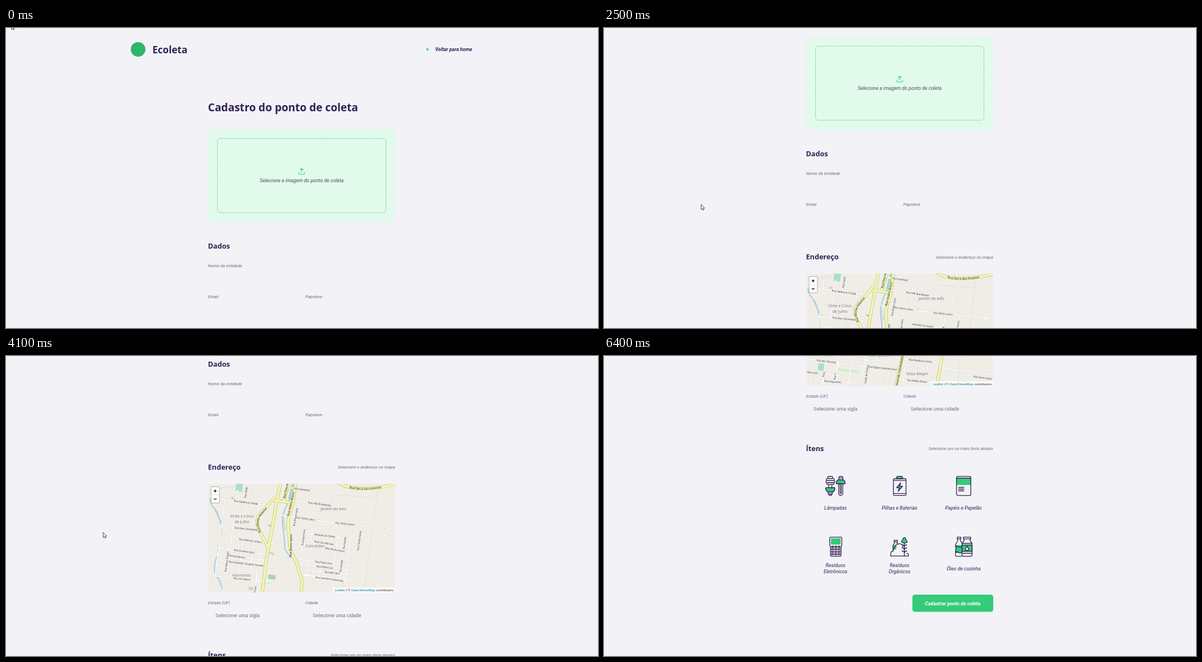
Animation of 1051 by 533 pixels, one loop 7.2 s. Source, as an HTML page:

```html
<!DOCTYPE html>
<html lang="pt-BR">
<head>
<meta charset="utf-8">
<title>Cadastro do ponto de coleta</title>
<style>
  html, body { margin: 0; height: 100%; overflow: hidden; background: #f3f2f7; }
  svg { display: block; width: 1051px; height: 533px; }
  .head { font: 700 12.65px "Open Sans", sans-serif; fill: #322153; }
  .hint, .item { font: italic 7.66px Roboto, sans-serif; fill: #6c6c80; }
  .item { font-size: 8.75px; fill: #322153; text-anchor: middle; }
  .bold { font-weight: 700; }
  .end { text-anchor: end; }
  .field { font: 8.75px "Liberation Sans", Arial, sans-serif; fill: #6c6c80; }
  .line { fill: none; stroke: #34cb79; stroke-width: 1.1; stroke-linecap: round; stroke-linejoin: round; }
  .icon { fill: none; stroke: #322153; stroke-width: 1.3; stroke-linejoin: round; stroke-linecap: round; }
  .icon .g { fill: #34cb79; }
  .map text { font: 4.3px "Noto Sans", sans-serif; fill: #222; text-anchor: middle;
    paint-order: stroke; stroke: #fffa; stroke-width: .6px; }
  .map .area { font-size: 6.9px; fill: #707080; }
  .map .wide { font-size: 5.3px; font-weight: 500; fill: #222; stroke: none; }
  .map .water { fill: #5f96b8; }
  .map path { fill: none; stroke-linejoin: round; }
  .credit { font: 6.02px "Liberation Sans", Arial, sans-serif; fill: #333; }
  .credit tspan { fill: #0078a8; }
</style>
</head>
<body>
<svg viewBox="0 0 1051 533">
  <defs>
    <clipPath id="frame"><rect width="332" height="193" rx="1"/></clipPath>
    <path id="arc" d="M229 -3Q262 18 331 1"/>
    <path id="bend" d="M100 97Q80 74 92 56L112 32"/>
  </defs>
  <g id="page">
    <circle cx="234.5" cy="38" r="13" fill="#2fb66c"/>
    <text class="head" x="260" y="44.5" style="font-size:17.1px">Ecoleta</text>
    <path class="line" d="M751.5 38h-5M749 35.4l-2.6 2.6 2.6 2.6"/>
    <text class="item bold" x="762" y="41.3" style="text-anchor:start">Voltar para home</text>
    <text class="head" x="358.5" y="148.3" style="font-size:19.04px">Cadastro do ponto de coleta</text>

    <rect x="358.7" y="180" width="332.2" height="164.5" rx="5.5" fill="#e1faec"/>
    <rect x="375.5" y="196.3" width="299" height="131.6" rx="5.5" fill="none" stroke="#4ecb79" stroke-width=".9" stroke-dasharray="1.8 1.3"/>
    <path class="line" d="M519.7 256.5v2q0 1.5 1.5 1.5h7.4q1.5 0 1.5-1.5v-2M525 256.5v-7M522 252.3l3-3 3 3"/>
    <text class="item" x="525" y="274.3" style="fill:#4e4958">Selecione a imagem do ponto de coleta</text>

    <text class="head" x="358.5" y="392">Dados</text>
    <text class="hint" x="358.7" y="425">Nome da entidade</text>
    <text class="hint" x="358.7" y="480">Email</text>
    <text class="hint" x="531.3" y="480">Papoleve</text>

    <text class="head" x="358.5" y="575.3">Endereço</text>
    <text class="hint end" x="690.7" y="573.6">Selecione o endereço no mapa</text>
    <g transform="translate(359 600.5)" clip-path="url(#frame)">
      <g class="map" id="first"></g>
      <g class="map" id="second"></g>
      <rect x="4.6" y="4.6" width="15.8" height="30" rx="2.5" fill="#0004"/>
      <rect x="5.6" y="5.6" width="13.8" height="28" rx="1.5" fill="#fff"/>
      <path d="M5.6 19.6h13.8" stroke="#ccc" stroke-width=".6"/>
      <path d="M9.8 12.7h5M12.3 10.2v5M9.8 27h5" stroke="#000" stroke-width="1.3"/>
      <rect x="221" y="184.3" width="111" height="9" fill="#fffb"/>
      <text class="credit end" x="329.3" y="191"><tspan>Leaflet</tspan> | © <tspan>OpenStreetMap</tspan> contributors</text>
    </g>
    <text class="hint" x="358.7" y="814">Estado (UF)</text>
    <text class="hint" x="531.3" y="814">Cidade</text>
    <text class="field" x="371.8" y="837.3">Selecione uma sigla</text>
    <text class="field" x="544.5" y="837.3">Selecione uma cidade</text>

    <text class="head" x="358.5" y="909">Ítens</text>
    <text class="hint end" x="690.7" y="907">Selecione um ou mais ítens abaixo</text>

    <g class="icon" transform="translate(393 953)">
      <rect x="4" y="1" width="9" height="3.6" rx="1.8"/><rect x="1.8" y="4.6" width="14" height="3.8" rx="1.9"/>
      <rect x=".8" y="8.4" width="16" height="3.8" rx="1.9"/><rect x="2.5" y="12.2" width="12.6" height="3.2" rx="1.6"/>
      <path d="M6 15.5V21M11.5 15.5V21M5 28.5h7.5V32H5zM6.5 32h4.6v2.5H6.5z"/>
      <path class="g" d="M.8 21h16v2.5q0 3.5-4 5h-8q-4-1.5-4-5z"/>
      <path d="M24 7V3q0-2 2-2h3q2 0 2 2v4M24 3.8h7"/>
      <path class="g" d="M19.5 14v-2q0-5 5-5H30q5 0 5 5v2z"/>
      <path d="M23.6 14v17q0 3.5 3.7 3.5T31 31V14M26.2 14v16.5q1.1 1.5 2.2 0V14"/>
    </g>
    <g class="icon" transform="translate(513 953)">
      <path class="g" d="M6.5 5V3Q6.5.7 9 .7h5.5q2.5 0 2.5 2.3v2z"/>
      <rect x=".8" y="5" width="22.4" height="29.6" rx="2"/>
      <path d="M1 8.2h22M1 31.3h22"/>
      <path class="g" d="M13.5 12.5l-7 8.5h4.7l-2 6.5 7.8-9h-5z"/>
    </g>
    <g class="icon" transform="translate(625 953)">
      <rect class="g" x="1" y="4" width="25" height="12" stroke="none"/>
      <rect x=".8" y=".8" width="25.5" height="34" rx="2.5"/>
      <path d="M1 4h25M4.5 20.5H14M4.5 23.5H14M4.5 26.5H14"/>
    </g>
    <g class="icon" transform="translate(400 1061)">
      <path d="M2.8.8h17.4q2 0 2 2V15l-1.3 4v13.5q0 2.3-2.3 2.3H4.4q-2.3 0-2.3-2.3V19L.8 15V2.8q0-2 2-2z"/>
      <rect class="g" x="3" y="3" width="17" height="11" stroke="none"/>
      <path id="keys"/>
    </g>
    <g class="icon" transform="translate(508 1061)">
      <path class="g" d="M5 22v-7h7l-2 8z" stroke="none"/>
      <path d="M7 6.5h6v2.8H7zM7.5 9.5v2l-2.5 4V25M12.5 9.5v2l1 2"/>
      <path d="M1 34.3V30q0-3.5 4-4.5l4-9q2-4 6-3.5 3-1.5 5 1 4 1 2 5M1 34.3h31.5v-3l-3-2"/>
      <path class="g" d="M20 9.5l3.2-6.5q2-3 4 0l3.3 6.5q-5.2 4-10.5 0z"/>
      <path d="M25.3 12v22M21 14.5q4.3 0 4.3 4 0-4 4.3-4M21 20q4.3 0 4.3 4 0-4 4.3-4M21 25.5q4.3 0 4.3 4 0-4 4.3-4"/>
    </g>
    <g class="icon" transform="translate(623 1061)">
      <path class="g" d="M1 15h11v14H1z" stroke="none"/>
      <path d="M4 .8h6.5v3H4zM4.8 4v4L1 14v4l1 3-1 4v8q0 1.8 2 1.8h9M9.8 4v3l2.2 4M1 18q3-2 5.5 0t5 0M1 28q3-2 5.5 0t5 0"/>
      <path class="g" d="M12.5 15h18v11h-18z"/>
      <path d="M15 .8h13v3H15zM16 4v3.5L12.5 12v20q0 2.8 2.8 2.8h12.4q2.8 0 2.8-2.8V12L27 7.5V4M13 12h17M13 29.5h17"/>
      <path d="M21.5 17q5.5 7 0 7.5-5.5-.5 0-7.5z" fill="#fff"/>
    </g>
    <text class="item" x="411" y="1012.5">Lâmpadas</text>
    <text class="item" x="524.7" y="1012.5">Pilhas e Baterias</text>
    <text class="item" x="638.4" y="1012.5">Papéis e Papelão</text>
    <text class="item" x="411" y="1115">Resíduos<tspan x="411" dy="10.6">Eletrônicos</tspan></text>
    <text class="item" x="524.7" y="1115">Resíduos<tspan x="524.7" dy="10.6">Orgânicos</tspan></text>
    <text class="item" x="638.4" y="1120.8">Óleo de cozinha</text>
    <rect x="547.5" y="1164" width="143.5" height="30.6" rx="4.5" fill="#34cb79"/>
    <text class="item bold" x="619" y="1182.6" style="fill:#fff">Cadastrar ponto de coleta</text>
  </g>
  <path id="cursor" d="M.5.5V9.5L2.6 7.8 4 10.7 5.4 10 4.2 7.2H6.7Z" fill="#fff" stroke="#222" stroke-width=".8"/>
</svg>
<script>
const $ = id => document.getElementById(id);

// Street name, centre and angle; the street itself runs under its name.
const firstStreets = [
  ['Rua Itamboré', 167, 10, 8], ['Rua Nilo Brandecker', 198, 36, 8], ['Rua Tomé Lohrin', 173, 62, 8],
  ['Rua Tomé Lohrin', 243, 71, 6], ['Avenida Ivo Stahm', 207, 92, 7], ['Rua Caio Elói Vart', 206, 105, 9],
  ['Elias Bruno Vartel', 225, 117, 10], ['Rua Pedra Fina', 205, 140, 7], ['Rua Pedra Lisa', 207, 148, 6],
  ['Rua Ipê Claro', 220, 158, 6], ['Rua Leandro Kuntermeg', 215, 169, 8], ['Rua Jatubá', 242, 105, -82],
  ['Rua Campo Ruivo', 268, 101, -82], ['Rua Jatubá', 236, 146, -82], ['Rua Egon Mirv', 169, 95, -82],
  ['Rua Breno Sarto', 155, 59, -80], ['Rua Valdemar Trindel', 67, 33, 8], ['Rua Davi Ostrenfeld', 67, 80, 6],
  ['Rua Fabrício Lenkus', 75, 101, 8], ['Rua Anselmo Dorv', 64, 120, 8], ['Rua Jurupema', 51, 129, 8],
  ['Rua Vereador Osvaldo Trentelli', 67, 142, 7], ['Rua Ciro Nehm', 60, 169, 6],
  ['Rua Matos Delvim', 33, 138, -82], ['Rua Valdo', 67, 15, -82], ['Rua Kort', 83, 190, -82]
];
const secondStreets = [
  ['Rua das Tarumãs', 36, 149, 7], ['Rua Edgar Holzenbrucker', 136, 161, 6], ['Rua Medeiros Coltim', 203, 148, 6],
  ['Rua Walter Brixen', 197, 184, 6], ['Rua Itaguembi', 47, 185, 5], ['dário Vels', 11, 169, 6],
  ['Rua K', 51, 176, -80], ['Rua J', 31, 172, -80], ['lando de Prados', 107, 172, -82], ['Rua Nereu Holst', 313, 178, 8]
];

const label = (text, x, y, angle = 0, kind = '') =>
  `<text class="${kind}" transform="translate(${x} ${y}) rotate(${angle})" y="1.5">${text}</text>`;
const onPath = (id, text) =>
  `<text class="wide" dy="1.8"><textPath href="#${id}" startOffset="50%">${text}</textPath></text>`;
const block = (x, y, w, h, color) =>
  `<rect x="${x}" y="${y}" width="${w}" height="${h}" fill="${color}" transform="rotate(7 ${x} ${y})"/>`;
const stroke = (d, color, width, extra = '') => `<path d="${d}" stroke="${color}" stroke-width="${width}" ${extra}/>`;
const road = (d, edge, fill, width) => stroke(d, edge, width + 1) + stroke(d, fill, width);

function street([, x, y, angle]) {
  const half = angle < -60 ? 28 : x < 110 ? 50 : 46, a = angle * Math.PI / 180;
  const dx = half * Math.cos(a), dy = half * Math.sin(a);
  return `M${x - dx} ${y - dy}l${2 * dx} ${2 * dy}`;
}
const parallel = (n, x, y, stepX, stepY, dx, dy) =>
  Array.from({ length: n }, (_, i) => `M${x + i * stepX} ${y + i * stepY}l${dx} ${dy}`).join('');

const drawMap = ({ ground, streets, extra, mains, names }) =>
  '<rect width="332" height="193" fill="#f0ede6"/>' + ground +
  road(streets.map(street).join('') + extra, '#dad8d5', '#fbfafa', 1.9) +
  road(mains, '#a9ae62', '#f4f7ae', 4.2) +
  streets.map(s => label(...s)).join('') + names;

$('first').innerHTML = drawMap({
  ground: block(50, -2, 12, 15, '#a9dfca') + block(107, 161, 13, 8, '#aecfae') + block(101, 172, 10, 5, '#cdf2c8') +
    block(41, 23, 5, 4, '#d4cec6') + block(72, 183, 8, 5, '#d4cec6') + block(108, 121, 9, 5, '#d9d0c9') +
    block(196, 62, 4, 4, '#c4eccb') + block(107, 73, 4, 2, '#aaa08f') +
    stroke('M3 26C5 46 14 40 18 56S25 78 23 90 17 105 17 118 11 132 11 150 17 164 19 170L25 186', '#9dcbe0', 1.7) +
    stroke('M151 0L144 28', '#a9d6cf', 5) +
    stroke('M144 28C136 45 130 58 132 72S136 100 136 116L147 132', '#9dcbe0', 1.8) +
    stroke('M302 5L288 110 276 193M0 12L60 2M230 20L302 25', '#cfcbc5', .7, 'stroke-dasharray="4 3"'),
  streets: firstStreets,
  extra: parallel(4, 32, 8, 20, 3, -20, 160) + parallel(4, 190, 20, 24, 3, -4, 32) + parallel(4, 185, 82, 23, 3, -12, 88) +
    parallel(2, 92, 112, 5, 0, -10, 81) + 'M0 125L100 142M162 160L262 172M270 74L326 79Q310 81 312 89T332 97M0 100L3 102',
  mains: 'M128 0L121 35 111 93 106 118 102 143 96 193M155 0L150 36 142 63 142 80 146 118 156 138 167 173 165 193' +
    'M120 22L92 54Q83 64 89 80L106 112M119 29L148 34M143 0L134 31M229 -3Q262 18 331 1',
  names: label('Jardim do Alto', 222, 45, 0, 'area') + label('Concórdia', 189, 111, 0, 'area') +
    label('Vinte e Cinco', 60, 58, 0, 'area') + label('de Julho', 60, 68, 0, 'area') + label('Harmonia', 59, 163, 0, 'area') +
    label('Arroio Tavim', 18, 58, 62, 'water') + label('Arroio Tavim', 135, 70, 80, 'water') +
    label('Rua Breno Sarto', 147, 110, -88, 'wide') + label('Rua Otávio Brenn', 147, 36, -77, 'wide') +
    label('Rua Davi d', 138, 13, -78, 'wide') + onPath('arc', 'Rua Serra das Aroeiras') + onPath('bend', 'Rua Monte Aldemar')
});

$('second').innerHTML = drawMap({
  ground: block(22, 152, 10, 13, '#a9dfca') + block(55, 161, 40, 4, '#cdeecf') +
    stroke('M290 0L268 193', '#cfcbc5', .7, 'stroke-dasharray="4 3"'),
  streets: secondStreets,
  extra: parallel(7, 2, 20, 0, 19, 150, 17) + parallel(6, 160, 12, 0, 22, 110, 12) + parallel(6, 30, 0, 23, 0, -24, 193) +
    parallel(4, 195, 0, 20, 0, -24, 193) + 'M235 160L332 173M155 100L143 193',
  mains: 'M192 0L171 140 159 193M262 0L241 140 232 193',
  names: label('Bom Jardim', 131, 139, 0, 'area') + label('Vista Alegre', 197, 172, 0, 'area') +
    label('Avenida Comendador', 166, 165, -79, 'wide')
});

let keys = '';
for (let row = 0; row < 4; row++)
  for (let col = 0; col < 3; col++) keys += `M${4 + col * 5.7} ${17 + row * 4.4}h3.5v2h-3.5z`;
$('keys').setAttribute('d', keys);

// Keys hold a time in ms followed by the values reached then.
const scroll = [[1300, 0], [1400, 3], [2100, 173], [2200, 173], [2500, 164], [2600, 164], [3100, 277.6], [3200, 277.6],
  [3800, 366], [4000, 366], [4600, 466], [4700, 466], [5200, 565], [5300, 565], [5400, 576], [5700, 576], [6400, 740]];
const pointer = [[100, 9, -7], [700, 153, 244], [800, 153, 244], [1000, 172, 313], [5700, 172, 313], [6400, 8, -14]];

function valueAt(track, time) {
  const next = track.findIndex(key => key[0] > time);
  if (next < 1) return (next ? track[track.length - 1] : track[0]).slice(1);
  const [t0, ...from] = track[next - 1], [t1, ...to] = track[next];
  const u = (time - t0) / (t1 - t0), eased = u * u * (3 - 2 * u);
  return from.map((v, i) => v + (to[i] - v) * eased);
}

function draw() {
  const time = Math.floor(performance.now() % 7200 / 100) * 100;
  $('page').setAttribute('transform', `translate(0 ${-valueAt(scroll, time)})`);
  $('cursor').setAttribute('transform', `translate(${valueAt(pointer, time)})`);
  $('second').style.display = time < 5800 ? 'none' : '';
  requestAnimationFrame(draw);
}
draw();
</script>
</body>
</html>
```
